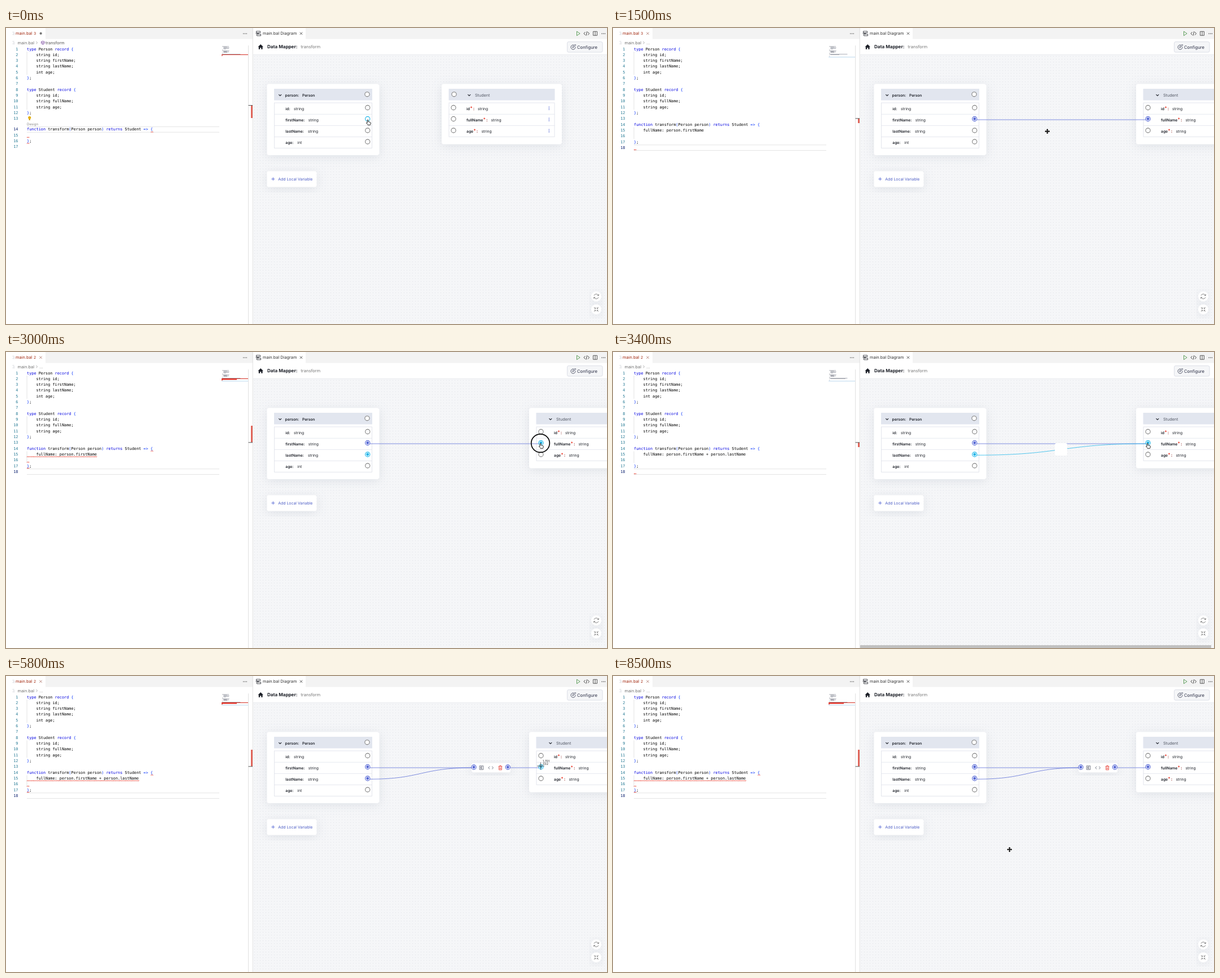
An HTML page that plays this animation: 1065x526 px, repeating every 8600 ms.

```html
<!DOCTYPE html>
<html lang="en">
<head>
<meta charset="utf-8">
<title>Data mapper</title>
<style>
html, body { margin: 0; width: 100%; height: 100%; overflow: hidden; background: #fff; }
svg { display: block; width: 100vw; height: 100vh; }
text { font-family: Inter, "Open Sans", sans-serif; white-space: pre; text-rendering: geometricPrecision; }
.code { font-family: "DejaVu Sans Mono", "Liberation Mono", monospace; font-size: 6.86px; }
</style>
</head>
<body>
<svg id="stage" viewBox="0 0 1065 526" preserveAspectRatio="none" xmlns="http://www.w3.org/2000/svg">
  <defs>
    <pattern id="dots" x="438" y="48" width="5" height="5" patternUnits="userSpaceOnUse">
      <circle cx="2.5" cy="2.5" r=".6" fill="#dcdee4"/>
    </pattern>
    <filter id="soft" x="-20%" y="-25%" width="140%" height="160%">
      <feDropShadow dx="0" dy="3" stdDeviation="9" flood-color="#8f98ad" flood-opacity=".22"/>
    </filter>
  </defs>
  <g id="back"></g>
  <g id="live"></g>
</svg>
<script>
const LOOP = 8600, STEP = 100;
const BLUE = '#5567d5', CYAN = '#18b4e8', GREY = '#808080', RED = '#e51400', INK = '#1d2028';

const rect = (x, y, w, h, fill, more = '') =>
  `<rect x="${x}" y="${y}" width="${w}" height="${h}" fill="${fill}" ${more}/>`;
const path = (d, color, width = 1, fill = 'none') =>
  `<path d="${d}" stroke="${color}" stroke-width="${width}" fill="${fill}"/>`;
const circle = (x, y, r, fill, more = '') =>
  `<circle cx="${x}" cy="${y}" r="${r}" fill="${fill}" ${more}/>`;
const text = (x, y, s, size, fill = INK, weight = 400) =>
  `<text x="${x}" y="${y}" font-size="${size}" fill="${fill}" font-weight="${weight}">${s}</text>`;
const esc = s => s.replace(/>/g, '&gt;').replace(/</g, '&lt;');
const cross = (x, y, color) => path(`M${x - 2.2} ${y - 2.2}l4.4 4.4m0 -4.4l-4.4 4.4`, color, .8);
const dots = (x, y, dx, dy, color) =>
  [-1, 0, 1].map(i => circle(x + i * dx, y + i * dy, .75, color)).join('');
const chevron = (x, y) => path(`M${x - 2.4} ${y - 1.2}l2.4 2.4l2.4 -2.4`, INK, 1.1);

function squiggle(x1, x2, y) {
  let d = `M${x1} ${y}`;
  for (let x = x1, up = 1; x < x2; x += 1.1, up = -up) d += `l1.1 ${-up * 1.1}`;
  return path(d, RED, .8);
}

function port(x, y, color = GREY, filled = false) {
  return circle(x, y, 4.1, '#fff', `stroke="${color}" stroke-width="1.1"`) +
    (filled ? circle(x, y, 2.4, color) : '');
}

// ---- fixed parts ----
function background() {
  const fileIcon = y => path(`M11.5 ${y - 2.2}h3M12.5 ${y}h3M11.5 ${y + 2.2}h4`, '#c3c6cd', .7);
  const roundButton = y => circle(1046, y, 9, '#fff', 'filter="url(#soft)"');
  return rect(0, 0, 1065, 526, '#fff') +
    rect(0, 0, 1065, 19.5, '#f3f3f3') + rect(0, 0, 70, 20, '#fff') + rect(438, 0, 93, 20, '#fff') +
    fileIcon(9.5) + fileIcon(26) + dots(423.5, 10, 2.7, 0, '#444') +
    rect(438, 48, 627, 478, '#f5f6f8') + rect(438, 48, 627, 473, 'url(#dots)') +
    rect(438, 47, 627, 1, '#e9eaee') +
    rect(429, 31, .8, 495, '#dadada') + rect(436.7, 0, 1, 526, '#e2e2e2') +
    // right tab and toolbar
    path('M443.5 5.8h7v2.8h-7zM444.5 11h7v2.8h-7zM442.5 9.8h5M447 8.6v2.4', INK, .8) +
    text(455, 12.2, 'main.bal Diagram', 7.35, '#333') + cross(523, 9.7, '#333') +
    path('M1011.5 6l5.6 3.8l-5.6 3.8z', '#388a34', .8) +
    path('M1026.5 7l-2.5 2.8l2.5 2.8M1031 7l2.5 2.8l-2.5 2.8M1029.7 6l-1.7 7.6', '#333', .9) +
    path('M1040.5 6.2h7v7h-7zM1044 6.2v7', '#333', .8) + dots(1058.7, 10, 2.7, 0, '#333') +
    // mapper header
    `<path d="M446.5 33.6l4.7 -4.6l4.7 4.6h-1.3v4.1h-2.4v-2.8h-2v2.8h-2.4v-4.1z" fill="${INK}"/>` +
    text(463, 36.4, 'Data Mapper:', 8.1, INK, 700) + text(522.3, 36.4, 'transform', 7.6, '#777') +
    rect(994.5, 24.5, 62.5, 18.5, '#f5f6f8', 'rx="2.5" stroke="#dcdfe7"') +
    path('M1006 30.2a4 4 0 1 0 3 3.4M1004 35l.5 -2l4 -4l1.3 1.3l-4 4z', '#40455a', .9) +
    text(1012, 36.7, 'Configure', 7.7, '#2b2f45') +
    // source record
    rect(462.5, 99.5, 199, 126.5, '#fff', 'rx="4" filter="url(#soft)"') +
    rect(475, 108, 174, 20.5, '#e2e6ef') + chevron(485.7, 119.3) +
    text(494.5, 122, 'person:', 6.7, INK, 600) + text(525, 122, 'Person', 6.6, INK, 600) +
    port(640, 117.8) + rows(475, 174, 4) +
    [['id:', 510, 'string'], ['firstName:', 535.7, 'string'], ['lastName:', 535, 'string'], ['age:', 516.3, 'int']]
      .map(([name, x, type], i) => text(495.3, 145.6 + i * 20, name, 6.7, INK, 600) +
        text(x, 145.6 + i * 20, type, 6.8)).join('') +
    rect(462.5, 254.5, 88, 28, '#fff', 'rx="3" filter="url(#soft)"') +
    path('M470.3 268.3h6M473.3 265.3v6', BLUE, .9) + text(482.3, 271, 'Add Local Variable', 6.9, '#4a5bc4') +
    // view buttons
    roundButton(477) + roundButton(500) +
    path('M1042 475.5a4.2 4.2 0 0 1 7.8 -.3M1050 478.5a4.2 4.2 0 0 1 -7.8 .3M1050.3 473v2.4h-2.5M1041.7 481v-2.4h2.5', '#777', .9) +
    path('M1042 496l2.7 2.7m0 -2v2h-2M1050 496l-2.7 2.7m0 -2v2h2M1042 504l2.7 -2.7m0 2v-2h-2M1050 504l-2.7 -2.7m0 2v-2h2', '#777', .8);
}

function rows(x, w, count) {
  let s = rect(x + .5, 133, w - 1, count * 20.1, '#fff', 'stroke="#e0e3eb" stroke-width=".9"');
  for (let i = 1; i < count; i++) s += rect(x, 132.7 + i * 20.1, w, .8, '#e0e3eb');
  return s;
}

// ---- code editor ----
const HEAD = ['type Person record {', '    string id;', '    string firstName;', '    string lastName;',
  '    int age;', '};', '', 'type Student record {', '    string id;', '    string fullName;',
  '    string age;', '};', '', 'function transform(Person person) returns Student => {'];
const FIRST = '    fullName: person.firstName', BOTH = FIRST + ' + person.lastName';

const paint = line => line.split(/(\b(?:type|record|function|returns)\b|=>|[{}()])/)
  .map((part, i) => i % 2 ? `<tspan fill="${/\w/.test(part) ? '#0000e0' : '#0431fa'}">${esc(part)}</tspan>` : esc(part))
  .join('');

function editor(t) {
  const filled = t >= 1300, both = t >= 3100;
  const body = filled ? [both ? BOTH : FIRST, '', '};', ''] : ['', '};', ''];
  const lines = [...HEAD, ...body];
  const errors = t < 1300 || (t >= 1900 && t < 3100) || t >= 4100;
  const lens = filled ? 0 : 8.8;
  const mid = i => 37 + i * 10.32 + (i >= 13 ? lens : 0);
  const current = filled ? 17 : 13;
  let s = '';

  s += text(17, 12.2, 'main.bal', 7.4, '#a1260d') + text(49, 12.2, t < 1900 ? '3' : '2', 6.8, '#a1260d');
  s += filled ? cross(61.5, 9.7, '#a5665a') : circle(61.7, 9.7, 2.1, '#777');
  s += text(20.5, 28.7, 'main.bal', 7.4, '#707070') + path('M53.5 23.8l2 2.3l-2 2.3', '#888', .7);
  s += filled ? text(59, 28.7, '…', 7.4, '#707070')
    : path('M62.5 24.6l2.8 -1.5l2.8 1.5v3l-2.8 1.5l-2.8 -1.5zM62.5 24.6l2.8 1.4l2.8 -1.4M65.3 26v3.1', '#652d90', .7) +
      text(69.9, 28.7, 'transform', 7.4, '#555');

  const top = mid(current) - 5;
  s += rect(37, top, 341, .8, '#dedede') + rect(37, top + 9.8, 341, .8, '#dedede');
  s += rect(36.7, 42, .7, 41.3, '#d6d6d6') + rect(36.7, 114.3, .7, 31, '#d6d6d6');
  if (filled) s += rect(36.7, 176.5, .7, 20.6, '#d6d6d6');
  lines.forEach((line, i) => {
    const y = mid(i) + 2.5;
    s += `<text class="code" x="21.5" y="${y}" text-anchor="end" fill="${i === current ? '#0b216f' : '#237893'}">${i + 1}</text>`;
    s += `<text class="code" x="37" y="${y}" fill="#000">${paint(line)}</text>`;
  });
  if (!filled) {
    s += text(37, 172.5, 'Design', 6.1, '#888');
    s += circle(41.7, 159.2, 2.5, '#e5ad00') + rect(40.6, 161.4, 2.2, 2.4, '#c79400');
  }

  if (errors) {
    s += squiggle(256.5, 260.5, mid(13) + 5.4);
    if (filled) s += squiggle(37, both ? 236 : 161, mid(14) + 5.2);
    const end = filled ? 15 : 14;
    s += squiggle(37, 41, mid(end) + 4.6) + squiggle(37, 41, mid(end + 1) + 5);
  } else s += squiggle(37, 41, 217);

  // minimap and overview ruler
  lines.forEach((line, i) => {
    const pad = line.search(/\S/);
    if (pad >= 0) s += rect(383 + pad * .6, 32.6 + i * 1.06, (line.length - pad) * .6, .6, '#777b88');
  });
  if (filled) s += rect(382, 51.4, 47, .8, '#a9cdea');
  if (errors) {
    s += rect(382, 46.9, 47, 1.1, '#d63a30');
    if (filled) s += rect(382, 47.6, 27, 1.8, '#e0261c') + rect(382, 49.6, 1.5, 1, RED);
    else s += rect(382, 48.6, 1.5, 1, RED);
  }
  const [y, h] = !errors ? [161, 8] : filled ? [131, 29.5] : [137, 23];
  s += rect(434, y, 3, h, '#e0655a') + rect(429.5, filled ? 160.3 : 137, 7.5, 1, '#555');
  return s;
}

// ---- diagram ----
function target(t) {
  const shift = t >= 1400 ? 155 : 0, head = shift ? 144 : 0;
  const w = shift ? 210 : 188;
  let s = rect(772 + shift, 99.5, w + 25, 107, '#fff', 'rx="4" filter="url(#soft)"') +
    rect(784.5 + shift, 108, w, 20.5, '#e2e6ef') + chevron(820.8 + head, 119.3) +
    text(831 + head, 122.2, 'Student', 7.2, '#555a66') + rows(784.5 + shift, w, 3);
  if (!shift) s += port(794, 117.8);
  [['id', 822.5, 836], ['fullName', 845.7, 859.5], ['age', 828.5, 842.5]].forEach(([name, star, type], i) => {
    const y = 145.8 + i * 20;
    s += text(816 + shift, y, name, 6.75, INK, 600) + text(star + shift, y - .6, '*', 8, RED) +
      text(star + 5.3 + shift, y, ':', 7.4, '#8e2a24', 700) + text(type + shift, y, 'string', 6.8);
    if (!shift) s += dots(962.3, 142.7 + i * 20, 0, 2.4, BLUE);
  });
  const hot = (t > 1000 && t < 1400) || (t >= 2800 && t < 8400);
  s += port(793 + shift, 141.5) + port(793 + shift, 182);
  return s + port(793 + shift, 161.5, hot ? CYAN : shift ? BLUE : GREY, shift > 0);
}

function sources(t) {
  const first = t < 200 ? [CYAN, false] : [t < 1400 ? CYAN : BLUE, true];
  const last = t < 2000 ? [GREY, false] : t < 2400 ? [CYAN, false] : [t < 3500 ? CYAN : BLUE, true];
  return port(640.8, 141.5) + port(640.8, 161.5, ...first) + port(640.8, 182, ...last) + port(640.8, 202);
}

function links(t) {
  if (t < 1400) return '';
  const curve = (x, color) => path(`M645 183.3C${(645 + x) / 2} 183.3 ${(645 + x) / 2} 163 ${x} 163`, color, .75);
  if (t < 3300) return path('M645 163H944', BLUE, .75);
  if (t < 3500) return path('M645 163H944', BLUE, .75) + curve(944, CYAN) +
    rect(783, 162, 22, 22, '#fff', 'rx="3"') + rect(438, 521, 622, 5, '#c1c1c1');
  return path('M645 163H826M893 163H944', BLUE, .75) + curve(826, BLUE) +
    rect(825, 154.8, 69, 16.4, '#fff', 'rx="3" filter="url(#soft)"') +
    port(829, 162, BLUE, true) + port(889.3, 162, BLUE, true) +
    path('M839.2 159.7h6.6v6.6h-6.6zM844 161.4h-2.8v3.2h2.8M841.2 163h2.4', '#565b6b', .8) +
    path('M857.3 160.7l-2.6 2.4l2.6 2.4M861 160.7l2.6 2.4l-2.6 2.4', '#565b6b', .8) +
    path('M872.7 160.6h6.6M874.8 160.4v-1h2.4v1M873.6 161v5.8h4.8v-5.8M875.2 162.5v3M876.8 162.5v3', '#e8483f', .9);
}

// ---- pointer ----
const TRACK = [[0, 641, 164], [300, 641, 164], [600, 700, 205], [800, 752, 188], [1000, 784, 159.5],
  [1100, 792, 163], [1400, 792, 163], [1700, 725, 225], [2100, 642.3, 184.3], [2400, 642.3, 184.3],
  [2600, 790, 190], [2800, 947, 163], [5000, 947, 163], [5100, 947.5, 160], [6800, 947.5, 160],
  [7000, 820, 360], [7800, 695.5, 412.5], [8200, 702.7, 308.3], [8600, 702.7, 308.3]];
const RINGS = [[100, 300, 16.3], [1100, 1300, 16.3], [2200, 2400, 16.3], [2900, 3100, 16.3], [8400, 8500, 35.5]];

function place(t) {
  const i = TRACK.findIndex((k, n) => n && t <= k[0]);
  const [t0, x0, y0] = TRACK[i - 1], [t1, x1, y1] = TRACK[i];
  const p = (t - t0) / (t1 - t0);
  return [x0 + (x1 - x0) * p, y0 + (y1 - y0) * p];
}

const hand = 'M-.8 .2c0 -1.5 1.8 -1.5 1.8 0v2.6c.5 -.5 1.5 -.3 1.6 .4c.5 -.4 1.4 -.1 1.5 .5c.6 -.2 1.1 .2 1.1 .8v1.6c0 .9 -.8 1.3 -.8 2.2h-4.3c-.2 -1.1 -1.6 -2 -2.4 -3.2c-.4 -.8 .5 -1.4 1.5 -.3z';
const arrows = 'M0 -4.6l1.9 2.2h-1.1v1.6h1.6v-1.1l2.2 1.9l-2.2 1.9v-1.1h-1.6v1.6h1.1l-1.9 2.2l-1.9 -2.2h1.1v-1.6h-1.6v1.1l-2.2 -1.9l2.2 -1.9v1.1h1.6v-1.6h-1.1z';

function pointer(t) {
  if (t >= 7100 && t < 7800) return '';
  const [x, y] = place(t);
  let s = '';
  if (t >= 5100 && t < 8200) {
    const px = Math.round(1263 + (x - 695.5) * 1.738), py = Math.round(773 + (y - 412.5) * 1.747);
    s = path('M-6.5 0H6.5M0 -6.5V6.5', '#444', .8) + circle(0, 0, 2.4, 'none', 'stroke="#777" stroke-width=".6"') +
      text(3.6, -7, px.toLocaleString('en-US'), 5.3, '#222') + text(3.6, -1.6, py, 5.3, '#222');
  } else {
    const overPort = t <= 300 || (t >= 1100 && t <= 1400) || (t >= 2100 && t <= 2400) || (t >= 2800 && t < 5100);
    s = overPort ? path(hand, '#111', .9, '#fff') : path(arrows, '#fff', 1.2) + path(arrows, 'none', 0, '#000');
  }
  s = `<g transform="translate(${x} ${y})">${s}</g>`;
  const ring = RINGS.find(([from, to]) => t >= from && t < to);
  if (ring) s += circle(x, y - .9, ring[2], 'none', 'stroke="#0a0a0a" stroke-width="1.7"');
  return s;
}

const live = document.getElementById('live');
document.getElementById('back').innerHTML = background();
let shown = -1;

function draw(t) {
  if (t === shown) return;
  shown = t;
  live.innerHTML = editor(t) + target(t) + links(t) + sources(t) + pointer(t);
}

const start = performance.now();
function tick() {
  const t = Math.max(0, performance.now() - start) % LOOP;
  draw(Math.floor(t / STEP) * STEP);
  requestAnimationFrame(tick);
}
draw(0);
requestAnimationFrame(tick);
</script>
</body>
</html>
```
